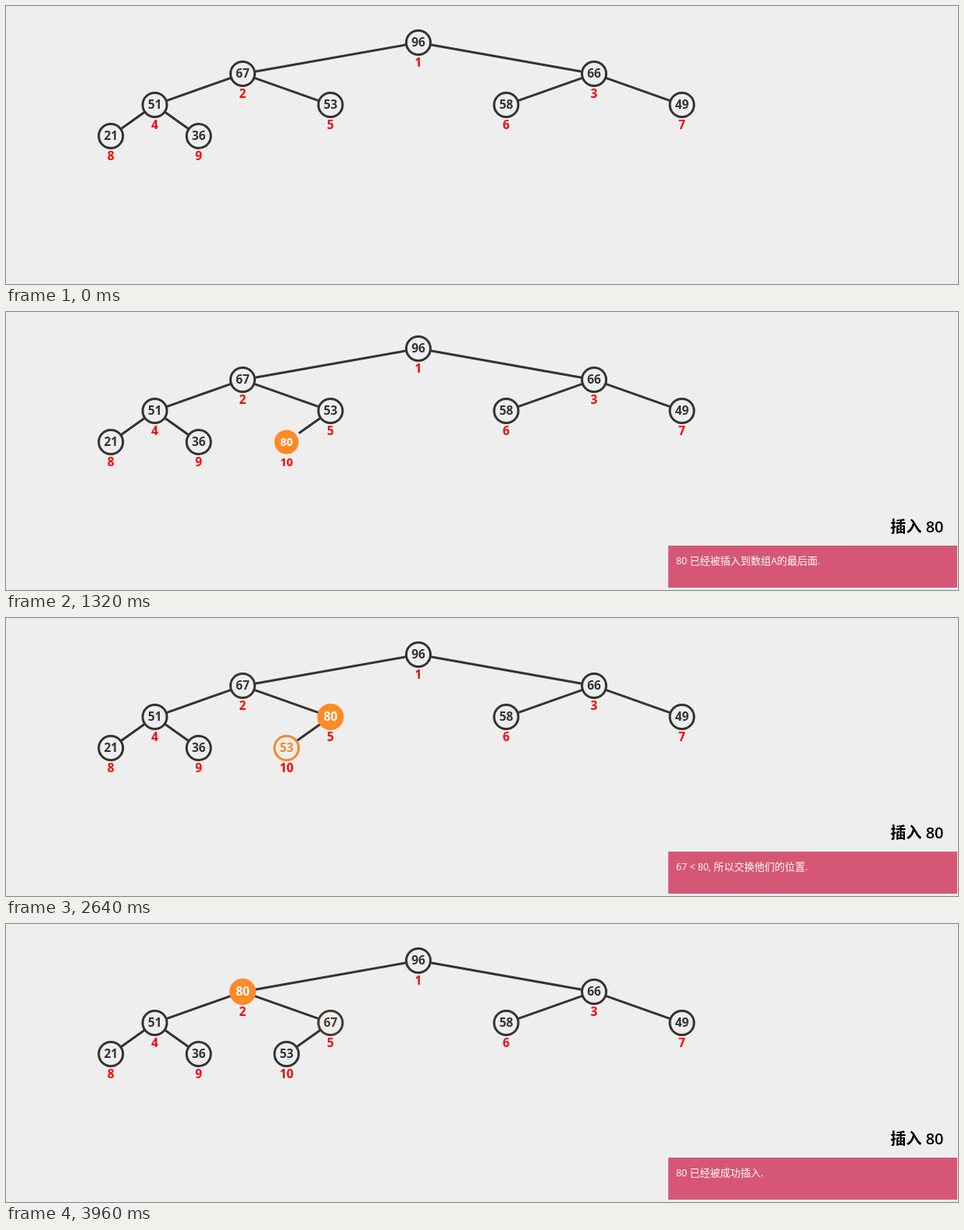
Animation of 1219x357 px, one loop 4.51 s. Source, as an HTML page:

```html
<!DOCTYPE html>
<html lang="zh">
<head>
<meta charset="utf-8">
<title>最大二叉堆</title>
<style>
  html, body { margin: 0; width: 100%; height: 100%; overflow: hidden; background: #eee; }
  svg { display: block; width: 1219px; height: 357px; }
  text { font-family: "Open Sans", "Noto Sans CJK SC", "Noto Sans CJK", sans-serif; }
  .cjk { font-family: "Noto Sans CJK SC", "Noto Sans CJK", sans-serif; }
  .edge { stroke: #333; stroke-width: 3; }
  .node text { font-weight: 700; text-anchor: middle; }
  .label { fill: #f00; }
  .title { font-size: 20px; font-weight: 600; }
  .title .cjk { font-weight: 700; }
  .status { font-size: 12.4px; fill: #fff; }
  .status .cjk { font-size: 13px; }
</style>
</head>
<body>
<svg viewBox="0 0 1219 357">
  <defs><clipPath id="clip"><rect id="clipBox" y="300" height="54"/></clipPath></defs>
  <g id="edges"></g>
  <g id="nodes"></g>
  <g id="info">
    <text class="title" x="1132.5" y="283.3"><tspan class="cjk">插入</tspan> 80</text>
    <rect id="panel" y="300" height="54" fill="#d65775"/>
    <g clip-path="url(#clip)"><text id="status" class="status" y="324"></text></g>
  </g>
</svg>
<script>
const LOOP = 4510;
// The picture is refreshed only at these moments.
const TICKS = [0, 550, 660, 770, 880, 990, 1110, 1260, 1360, 1460, 1560, 1660, 1760, 1880,
  2090, 2200, 2310, 2420, 2530, 2640, 2750, 2850, 2960, 3080, 3190, 3300, 3410, 3510,
  3620, 3740, 3850, 3960];

// Start of each stage
const OPEN = 405, INSERT = 900, COMPARE1 = 1440, SWAP1 = 2017,
  COMPARE2 = 2543, SWAP2 = 3068, DONE = 3594;

const MESSAGES = [
  [OPEN, '当前最大二叉堆'],
  [INSERT, '80 已经被插入到数组A的最后面.'],
  [COMPARE1, '53 < 80, 所以交换他们的位置.'],
  [SWAP1, '80 <-> 53 已经被交换了.'],
  [COMPARE2, '67 < 80, 所以交换他们的位置.'],
  [SWAP2, '80 <-> 67 已经被交换了.'],
  [DONE, '80 已经被成功插入.']
];

const HEAP = [96, 67, 66, 51, 53, 58, 49, 21, 36, 80];
const DARK = [51, 51, 51], ORANGE = [255, 138, 39];
const $ = id => document.getElementById(id);

function add(parent, tag, attrs = {}) {
  const node = document.createElementNS('http://www.w3.org/2000/svg', tag);
  set(node, attrs);
  return parent.appendChild(node);
}

function set(node, attrs) {
  for (const key in attrs) node.setAttribute(key, attrs[key]);
}

const mix = (a, b, k) => a.map((v, i) => v + (b[i] - v) * k);
const clamp = v => Math.min(1, Math.max(0, v));

// Cubic in-out progress of a 500 ms stage
function ease(t, start) {
  const p = clamp((t - start) / 500);
  return p < 0.5 ? 4 * p ** 3 : 1 - 4 * (1 - p) ** 3;
}

// Position of a 1-based heap slot
function slot(i) {
  const level = Math.floor(Math.log2(i)), count = 2 ** level;
  return [528 + 900 * ((i - count + 0.5) / count - 0.5), 47 + 40 * level];
}

// Edge from the rim of a parent to the rim of its child
function edgeEnds(i) {
  const a = slot(i >> 1), b = slot(i);
  const k = 16 / Math.hypot(b[0] - a[0], b[1] - a[1]);
  return [mix(a, b, k), mix(b, a, k)];
}

function drawEdge(line, i, grow) {
  const [a, end] = edgeEnds(i), b = mix(a, end, grow);
  set(line, { x1: a[0], y1: a[1], x2: b[0], y2: b[1], visibility: grow > 0 ? 'visible' : 'hidden' });
}

const edges = {}, nodes = {};
HEAP.forEach((value, n) => {
  const i = n + 1;
  if (i > 1) drawEdge(edges[i] = add($('edges'), 'line', { class: 'edge' }), i, 1);
  const g = add($('nodes'), 'g', { class: 'node' });
  const circle = add(g, 'circle');
  const text = add(g, 'text', { y: 5.3 });
  const label = add(g, 'text', { y: 31, class: 'label' });
  text.textContent = value;
  nodes[value] = { g, circle, text, label };
  drawNode(value, i, slot(i));
});

function drawNode(value, index, [x, y], { heat = 0, solid = false, size = 1 } = {}) {
  const { g, circle, text, label } = nodes[value];
  const color = `rgb(${mix(DARK, ORANGE, heat).map(Math.round)})`;
  const font = `font-size:${15.5 * size}px`;
  set(g, { transform: `translate(${x} ${y})`, visibility: size > 0 ? 'visible' : 'hidden' });
  set(circle, { r: 15.5 * size, stroke: color, 'stroke-width': 3 * size, fill: solid ? color : '#eee' });
  set(text, { fill: solid ? '#fff' : color, style: font });
  set(label, { style: font });
  label.textContent = index;
}

let shown = '';
function write(message) {
  if (message === shown) return;
  shown = message;
  $('status').textContent = '';
  for (const part of message.match(/[\u4e00-\u9fff]+|[^\u4e00-\u9fff]+/g) || []) {
    const cjk = part.charCodeAt(0) >= 0x4e00;
    add($('status'), 'tspan', cjk ? { class: 'cjk' } : {}).textContent = part;
  }
}

function draw(t) {
  const grow = ease(t, INSERT), swap1 = ease(t, SWAP1), swap2 = ease(t, SWAP2);
  const compare2 = ease(t, COMPARE2);
  const [top, mid, low] = [2, 5, 10].map(slot);

  drawEdge(edges[10], 10, grow);
  drawNode(53, t < SWAP1 ? 5 : 10, mix(mid, low, swap1), { heat: ease(t, COMPARE1) - compare2 });
  drawNode(67, t < SWAP2 ? 2 : 5, mix(top, mid, swap2), { heat: compare2 - ease(t, DONE) });
  drawNode(80, t < SWAP1 ? 10 : t < SWAP2 ? 5 : 2, mix(mix(low, mid, swap1), top, swap2),
    { heat: 1, solid: true, size: grow });

  const width = 370 * (0.5 - Math.cos(Math.PI * clamp((t - OPEN) / 400)) / 2);
  const box = { x: 1218 - width, width };
  set($('info'), { visibility: t < OPEN ? 'hidden' : 'visible' });
  set($('panel'), box);
  set($('clipBox'), box);
  set($('status'), { x: box.x + 10 });
  const current = MESSAGES.filter(([start]) => t >= start).pop();
  write(current ? current[1] : '');
}

const begin = performance.now();
function frame() {
  const t = (performance.now() - begin) % LOOP;
  draw(TICKS.filter(tick => tick <= t).pop());
  requestAnimationFrame(frame);
}
frame();
</script>
</body>
</html>
```
